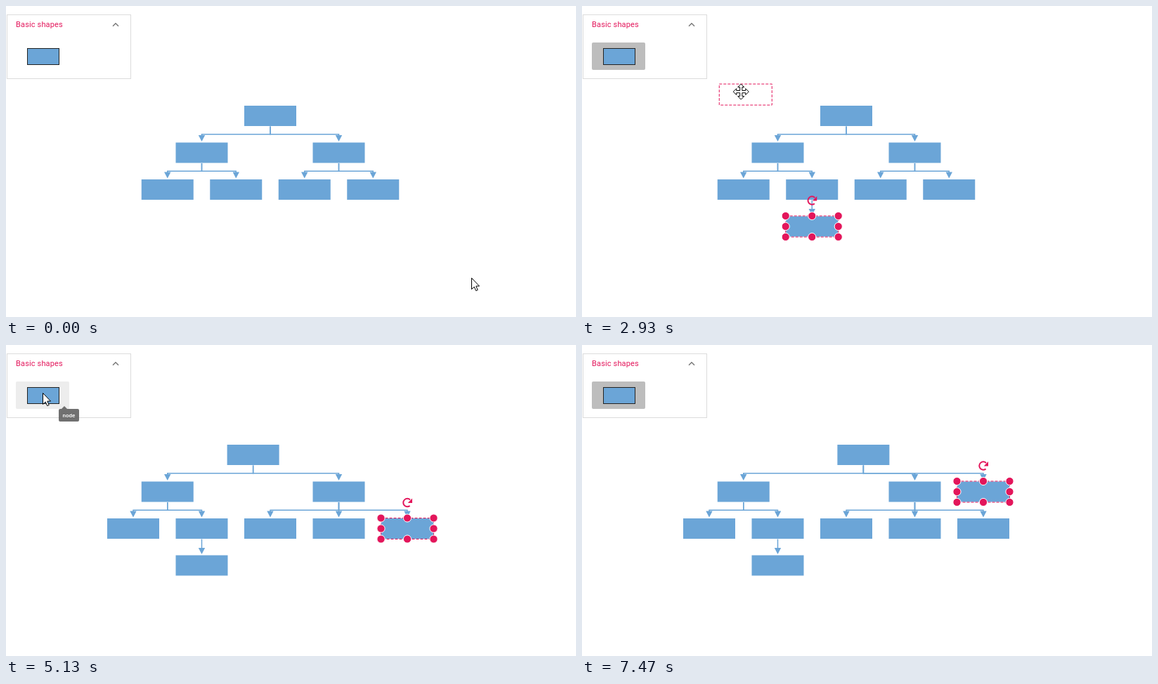
Animation, 811 px wide and 443 px high, one loop 8470 ms. Source, as an HTML page:

```html
<!DOCTYPE html>
<html lang="en">
<head>
<meta charset="utf-8">
<title>Org chart editor</title>
<style>
html, body { margin: 0; width: 100%; height: 100%; overflow: hidden; background: #fff; }
svg { display: block; font-family: Roboto, sans-serif; }
.title { font-size: 11px; letter-spacing: .15px; fill: #e3165b; }
.node { fill: #6ba5d7; }
.link { fill: none; stroke: #6ba5d7; stroke-width: 1.5; }
.dash { fill: none; stroke: #e3165b; stroke-dasharray: 4 2; }
.target { fill: none; stroke: #e3165b; stroke-width: 1.6; }
.grip { fill: #e3165b; stroke: #fff; }
.tip { fill: #616161; fill-opacity: .9; }
.label { font-size: 8px; font-weight: 500; fill: #fff; text-anchor: middle; }
.cursor { fill: #fff; stroke: #000; stroke-linejoin: round; }
.symbol { fill: #6ba5d7; stroke: #222; }
</style>
</head>
<body>
<svg width="811" height="443" viewBox="0 0 811 443">
  <defs>
    <path id="arrow" class="cursor" d="M.5.5V16.5L4.2 13 6.7 18.6 9.2 17.5 6.8 12H11.5Z"/>
    <path id="move" class="cursor" d="M0-11 4.5-6.5H1.6V-1.6H6.5V-4.5L11 0 6.5 4.5V1.6H1.6V6.5H4.5L0 11-4.5 6.5H-1.6V1.6H-6.5V4.5L-11 0-6.5-4.5V-1.6H-1.6V-6.5H-4.5Z"/>
    <g id="rotate">
      <path d="M3.6 4.4A5.7 5.7 0 1 1 4-4" fill="none" stroke="#e3165b" stroke-width="2"/>
      <path d="M7-6V.5H.7Z" fill="#e3165b"/>
    </g>
  </defs>
  <rect x="1.5" y="12.5" width="176" height="91" fill="#fff" stroke="#dcdcdc"/>
  <text class="title" x="14" y="30">Basic shapes</text>
  <path d="M152 28.7 156 24.7 160 28.7" fill="none" stroke="#757575" stroke-width="1.4"/>
  <rect id="cell" x="14" y="52" width="76" height="39" rx="2" fill="none"/>
  <rect class="symbol" x="30.5" y="60.5" width="45" height="23"/>
  <g id="scene"></g>
</svg>
<script>
const LOOP = 8470, STEP = 200 / 3, W = 75, H = 30;
const scene = document.getElementById('scene');
const cell = document.getElementById('cell');

// Trees: [column, ...children]
const leftPart = [-3, [-4], [-2, [-2]]], rightPart = [2, [0], [2], [4]];
const layouts = [
  { tree: [0, [-2, [-3], [-1]], [2, [1], [3]]] },
  { tree: [0, [-2, [-3], [-1, [-1]]], [2, [1], [3]]], picked: [-1, 3] },
  { tree: [-.5, leftPart, rightPart], picked: [4, 2] },
  { tree: [.5, leftPart, rightPart, [4]], picked: [4, 1] }
];

const drags = [
  { press: 925, enter: 1190, drop: 1860, dx: 101.5, dy: -51.5 },
  { press: 2790, enter: 2925, drop: 3790, dx: 151.5, dy: -66.5 },
  { press: 5190, enter: 5390, drop: 5990, dx: 114.5, dy: -84.5 }
];
const hints = [670, 2470, 4640];

const linear = u => u, smooth = u => u * u * (3 - 2 * u), out = u => u * (2 - u);
// Pointer keys: time, x, y, easing towards the key
const keys = [
  [0, 662, 387], [667, 52, 68, smooth], [930, 52, 68],
  [1400, 338, 261, linear], [1590, 305.5, 256.5, smooth], [1800, 305.5, 256.5],
  [2400, 52, 68, smooth], [2770, 52, 68],
  [2930, 222.5, 120.5, linear], [3330, 450, 217, out], [3460, 456.5, 212.5, smooth], [3740, 456.5, 212.5],
  [4600, 52, 68, smooth], [5135, 52, 68],
  [5660, 345.5, 158.5, smooth], [6135, 345.5, 158.5],
  [6200, 395, 144, linear], [6330, 438, 162, out], [6540, 438, 162],
  [7395, 137, 434, smooth]
];

const clamp = v => Math.max(0, Math.min(1, v));
const colX = c => 376 + 48.75 * c;
const rowY = r => 156.5 + 52.5 * r;

function pointer(t) {
  const i = keys.findIndex(k => k[0] > t);
  if (i < 0) return keys[keys.length - 1].slice(1, 3);
  const a = keys[i - 1], b = keys[i];
  const u = (b[3] || linear)((t - a[0]) / (b[0] - a[0]));
  return [a[1] + (b[1] - a[1]) * u, a[2] + (b[2] - a[2]) * u];
}

const box = (cls, x, y, w = W, h = H) =>
  `<rect class="${cls}" x="${x}" y="${y}" width="${w}" height="${h}"/>`;
const use = (id, x, y) => `<use href="#${id}" x="${x}" y="${y}"/>`;

function link(x1, y1, x2, y2) {
  const mid = (y1 + y2) / 2;
  return `<path class="link" d="M${x1} ${y1}V${mid}H${x2}V${y2 - 6}"/>` +
    `<path class="node" d="M${x2 - 4.7} ${y2 - 10}h9.4l-4.7 9Z"/>`;
}

function chart(tree) {
  const nodes = [];
  let links = '';
  (function walk([col, ...kids], row) {
    const x = colX(col), y = rowY(row);
    nodes.push([x, y]);
    for (const kid of kids) {
      links += link(x, y + H / 2, colX(kid[0]), rowY(row + 1) - H / 2);
      walk(kid, row + 1);
    }
  })(tree, 0);
  const rects = nodes.map(([x, y]) => box('node', x - 37, y - 14.5, 74, 29)).join('');
  return { nodes, svg: links + rects };
}

function selection([col, row]) {
  const x = colX(col), y = rowY(row);
  let s = box('dash', x - W / 2, y - H / 2) + use('rotate', x, y - 37);
  for (const i of [-1, 0, 1]) for (const j of [-1, 0, 1])
    if (i || j) s += `<circle class="grip" cx="${x + i * W / 2}" cy="${y + j * H / 2}" r="5.6"/>`;
  return s;
}

function bubble(text, x, y, w, h, tipX, alpha) {
  return `<g opacity="${alpha}"><path class="tip" d="M${x + 2} ${y}H${tipX - 4}l4-4 4 4H${x + w - 2}` +
    `q2 0 2 2v${h - 4}q0 2-2 2h${4 - w}q-2 0-2-2v${4 - h}q0-2 2-2Z"/>` +
    `<text class="label" x="${x + w / 2}" y="${y + h / 2 + 3}">${text}</text></g>`;
}

function coords(d, x, y, alpha) {
  const text = `X:${Math.round(x + d.dx)} Y:${Math.round(y + d.dy)}`;
  const w = text.length * 5, mid = x + W / 2;
  return bubble(text, mid - w / 2, y + 35.5, w, 19, mid, alpha);
}

const charts = layouts.map(l => chart(l.tree));

function draw(t) {
  const stage = drags.filter(d => t >= d.drop).length;
  const { picked } = layouts[stage];
  const { nodes, svg } = charts[stage];
  const [x, y] = pointer(t);
  const drag = drags.find(d => t >= d.press && t < d.drop);
  const inCell = x > 14 && x < 90 && y > 52 && y < 91;
  let s = svg + (picked ? selection(picked) : '');
  let shape = 'arrow';

  cell.setAttribute('fill', inCell && !drag ? '#ededed' : t >= drags[0].press ? '#bdbdbd' : 'none');

  if (drag && t < drag.enter) {
    s += box('symbol', x + 3, y + 4, 45, 23);
  } else if (drag) {
    const fresh = t - drag.enter < 50;
    const px = x + (fresh ? -31 : 3), py = y + (fresh ? -11 : 4);
    shape = 'move';
    if (!fresh) s += box('node', px, py);
    s += box('dash', px, py);
    const hit = nodes.find(n => Math.abs(n[0] - x) < W / 2 && Math.abs(n[1] - y) < H / 2);
    if (hit) s += box('target', hit[0] - W / 2, hit[1] - H / 2);
    if (!fresh) s += coords(drag, px, py, 1);
  }

  const last = drags[stage - 1];
  if (last && t < last.drop + 220) {
    const [lx, ly] = pointer(last.drop - 60);
    if (t < last.drop + 180) shape = 'move';
    s += coords(last, lx + 3, ly + 4, clamp(1 - (t - last.drop) / 220));
  }

  hints.forEach((from, i) => {
    if (t > from && t < drags[i].press)
      s += bubble('node', 75, 91, 29, 18, 83, clamp((t - from) / 200));
  });

  if (t < 7460) s += use(shape, x, y);
  scene.innerHTML = s;
}

const start = performance.now();
let shown = -1;
function tick() {
  const t = (performance.now() - start) % LOOP;
  const k = Math.floor((t + 4) / STEP);
  if (k !== shown) draw((shown = k) * STEP);
  requestAnimationFrame(tick);
}
tick();
</script>
</body>
</html>
```
